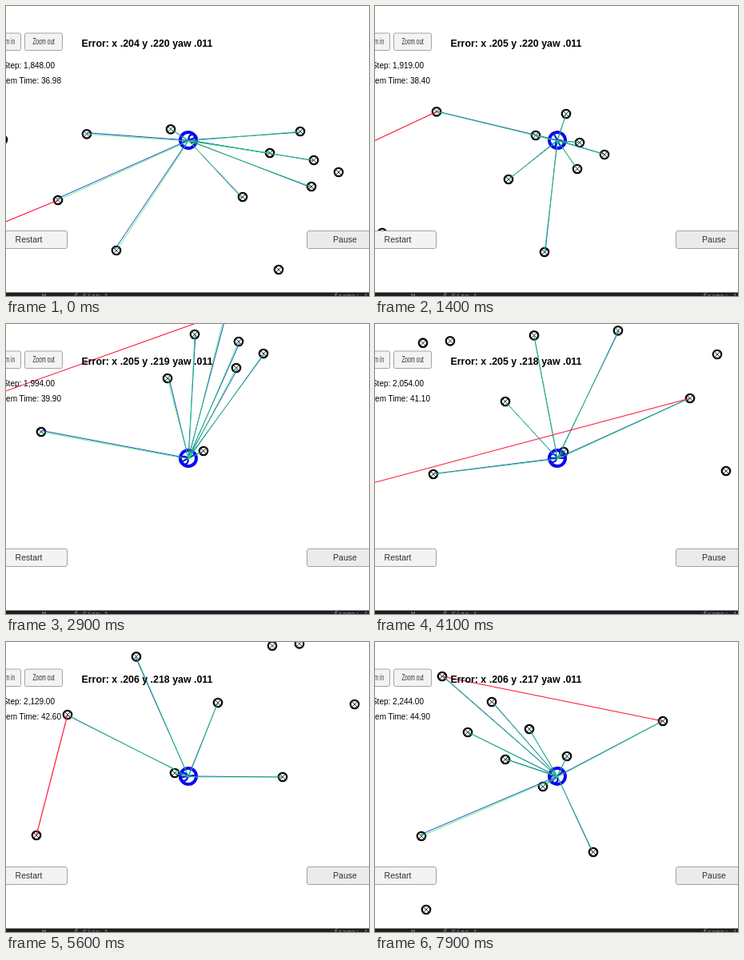
These frames come from a looping animation (454x363 px, 8 s). An HTML page:

```html
<!DOCTYPE html>
<html lang="en">
<head>
<meta charset="utf-8">
<title>Robot localisation</title>
<style>
  html, body { margin: 0; width: 100%; height: 100%; overflow: hidden; background: #fff; }
  svg { display: block; width: 454px; height: 363px; }
  text { font-family: "Liberation Sans", Arial, sans-serif; font-size: 10px; fill: #000; }
  path { fill: none; }
  .button rect { fill: #f3f3f3; stroke: #a3a3a3; }
  .button text { font-size: 10.5px; fill: #323232; text-anchor: middle; }
  .footer text { font: 9px "Liberation Mono", monospace; fill: #8a8a8a; }
  .end { text-anchor: end; }
</style>
</head>
<body>
<svg viewBox="0 0 454 363">
  <path id="marks" stroke="#080808" stroke-width="2.3"/>
  <path id="crosses" stroke="#222" stroke-width="0.9"/>
  <g id="robot" stroke="#0a0af0" fill="none">
    <circle r="10" stroke-width="4"/>
    <circle cx="6" r="5" stroke-width="2.4"/>
    <path d="M-8 0H10" stroke-width="2"/>
  </g>
  <path id="measured" stroke="#1648c8"/>
  <path id="estimated" stroke="#22e85c" opacity="0.75"/>
  <path id="farthest" stroke="#ff1038" stroke-width="1.1"/>

  <g class="button">
    <rect x="-29" y="34" width="47.5" height="21.5" rx="2"/>
    <rect x="23.5" y="34" width="47" height="21.5" rx="2"/>
    <g transform="scale(.62 1)">
      <text x="-1" y="48.5">Zoom in</text>
      <text x="76" y="48.5">Zoom out</text>
    </g>
    <rect x="-20" y="281.5" width="96.5" height="22" rx="2.5"/>
    <text x="28.5" y="296.3">Restart</text>
    <rect x="376.5" y="281.5" width="96" height="22" rx="2.5" style="fill:#ebebeb"/>
    <text x="424" y="296.3">Pause</text>
  </g>
  <text id="error" x="94.5" y="51" style="font-size:12.4px;font-weight:bold"></text>
  <text id="step" class="end" x="61" y="78"></text>
  <text id="clock" class="end" x="69" y="96.5"></text>

  <g class="footer">
    <rect y="358.5" width="454" height="5" fill="#1f1f22"/>
    <text x="45" y="366">M</text>
    <text x="85" y="366">f.Size 1</text>
    <text x="410" y="366">frame: 152</text>
  </g>
</svg>
<script>
const LOOP = 8000, FRAME = 100, RANGE = 191.5;
const CENTER = { x: 228, y: 168 };

const waypoint = (t, x, y) => ({ t, x, y });
const ROUTE = [
  waypoint(0, 228, 168), waypoint(1400, 357, 190), waypoint(2900, 322, 339),
  waypoint(4100, 130, 314), waypoint(5600, -143, 333),
  waypoint(6700, -317, 381), waypoint(7900, -465, 476)
];

const repeat = (n, make) => Array.from({ length: n }, (_, i) => make(i));
const wall = x => [x, 167 - .07 * x + .00004 * x * x];
const ANCHOR = [-333, 407];
const LANDMARKS = [
  ANCHOR,
  // a bent wall, dense and then sparse
  ...repeat(3, i => wall(206 - 105 * i)),
  ...repeat(4, i => wall(-38 - 170 * i)),
  // two slanted rows of three
  ...repeat(6, i => {
    const column = i % 3, row = i < 3 ? 0 : 1;
    return [-547 + 47 * column - 30 * row, 383 + 34 * column + 38 * row];
  }),
  // loose ones
  [368, 157], [330, 184], [385, 193], [416, 208], [382, 226], [296, 239],
  [65, 243], [138, 306], [341, 330], [-25, 334], [-106, 241], [-294, 256],
  [-160, 329], [-445, 267], [-420, 571], [-609, 351], [-635, 551], [-629, 643]
];

const el = id => document.getElementById(id);
const decimal = v => v.toFixed(3).slice(1);
const noise = n => {
  const s = Math.sin(n * 12.9898) * 43758.5453;
  return s - Math.floor(s) - .5;
};

function slope(a, b) {
  const span = b.t - a.t;
  return { x: (b.x - a.x) / span, y: (b.y - a.y) / span };
}

// Inner waypoints keep the mean speed of both legs; ends continue the curve.
function velocity(i) {
  const last = ROUTE.length - 1;
  if (i === 0 || i === last) {
    const inner = i ? last - 1 : 1;
    const leg = slope(ROUTE[i], ROUTE[inner]), v = velocity(inner);
    return { x: 2 * leg.x - v.x, y: 2 * leg.y - v.y };
  }
  const before = slope(ROUTE[i - 1], ROUTE[i]), after = slope(ROUTE[i], ROUTE[i + 1]);
  const through = slope(ROUTE[i - 1], ROUTE[i + 1]);
  const speed = (Math.hypot(before.x, before.y) + Math.hypot(after.x, after.y)) / 2;
  const scale = speed / Math.hypot(through.x, through.y);
  return { x: through.x * scale, y: through.y * scale };
}

function robotAt(t) {
  let i = 0;
  while (i < ROUTE.length - 2 && t >= ROUTE[i + 1].t) i++;
  const a = ROUTE[i], b = ROUTE[i + 1], va = velocity(i), vb = velocity(i + 1);
  const span = b.t - a.t, u = (t - a.t) / span, ease = u * u * (3 - 2 * u);
  const along = k => a[k] + (b[k] - a[k]) * ease
    + span * u * (1 - u) * ((1 - u) * va[k] - u * vb[k]);
  const turn = k => va[k] + (vb[k] - va[k]) * u;
  return {
    x: along("x"), y: along("y"),
    heading: Math.atan2(turn("y"), turn("x")) * 180 / Math.PI
  };
}

const line = (a, b) => `M${a.x} ${a.y}L${b.x} ${b.y}`;
const ring = ({ x, y }, r) =>
  `M${x - r} ${y}a${r} ${r} 0 1 0 ${2 * r} 0a${r} ${r} 0 1 0 ${-2 * r} 0`;
const cross = ({ x, y }, r) =>
  `M${x - r} ${y - r}l${2 * r} ${2 * r}m0 ${-2 * r}l${-2 * r} ${2 * r}`;

function drawScene(t) {
  const robot = robotAt(t);
  const points = LANDMARKS.map(([x, y]) => {
    const dx = x - robot.x, dy = y - robot.y;
    return { x: dx + CENTER.x, y: dy + CENTER.y, dx, dy, distance: Math.hypot(dx, dy) };
  });
  const seen = points.filter(p => p.distance < RANGE);
  const far = seen.reduce((a, b) => b.distance > a.distance ? b : a);
  const guess = { x: CENTER.x + .5, y: CENTER.y + 1 };

  // Sightings swing sideways together, each with a little error of its own.
  const swing = .024 * noise(t / FRAME + 1);
  const sightings = seen.map((p, i) => {
    const angle = swing + .016 * noise(t / FRAME + i * 7.3);
    return { x: p.x - p.dy * angle, y: p.y + p.dx * angle };
  });

  const paths = {
    marks: points.map(p => ring(p, 5.2)).join(""),
    crosses: points.map(p => cross(p, 3.2)).join(""),
    measured: sightings.map(p => line(CENTER, p)).join(""),
    estimated: seen.map(p => line(guess, p)).join(""),
    farthest: line(points[0], far)
  };
  for (const id in paths) el(id).setAttribute("d", paths[id]);
  el("robot").setAttribute("transform",
    `translate(${CENTER.x} ${CENTER.y}) rotate(${robot.heading})`);
}

function drawReadout(t) {
  const seconds = t / 1000, step = 1848 + Math.ceil(50.1 * seconds);
  const errorX = .20448 + .0002 * seconds, errorY = .2202 - .00042 * seconds;
  el("error").textContent = `Error: x ${decimal(errorX)} y ${decimal(errorY)} yaw .011`;
  el("step").textContent = `Step: ${step.toLocaleString("en-US")}.00`;
  el("clock").textContent = `System Time: ${((step + 1) / 50).toFixed(2)}`;
}

const start = performance.now();
function tick() {
  const elapsed = (performance.now() - start) % LOOP;
  const t = Math.floor(elapsed / FRAME) * FRAME;
  drawScene(t);
  drawReadout(t);
  requestAnimationFrame(tick);
}
tick();
</script>
</body>
</html>
```
